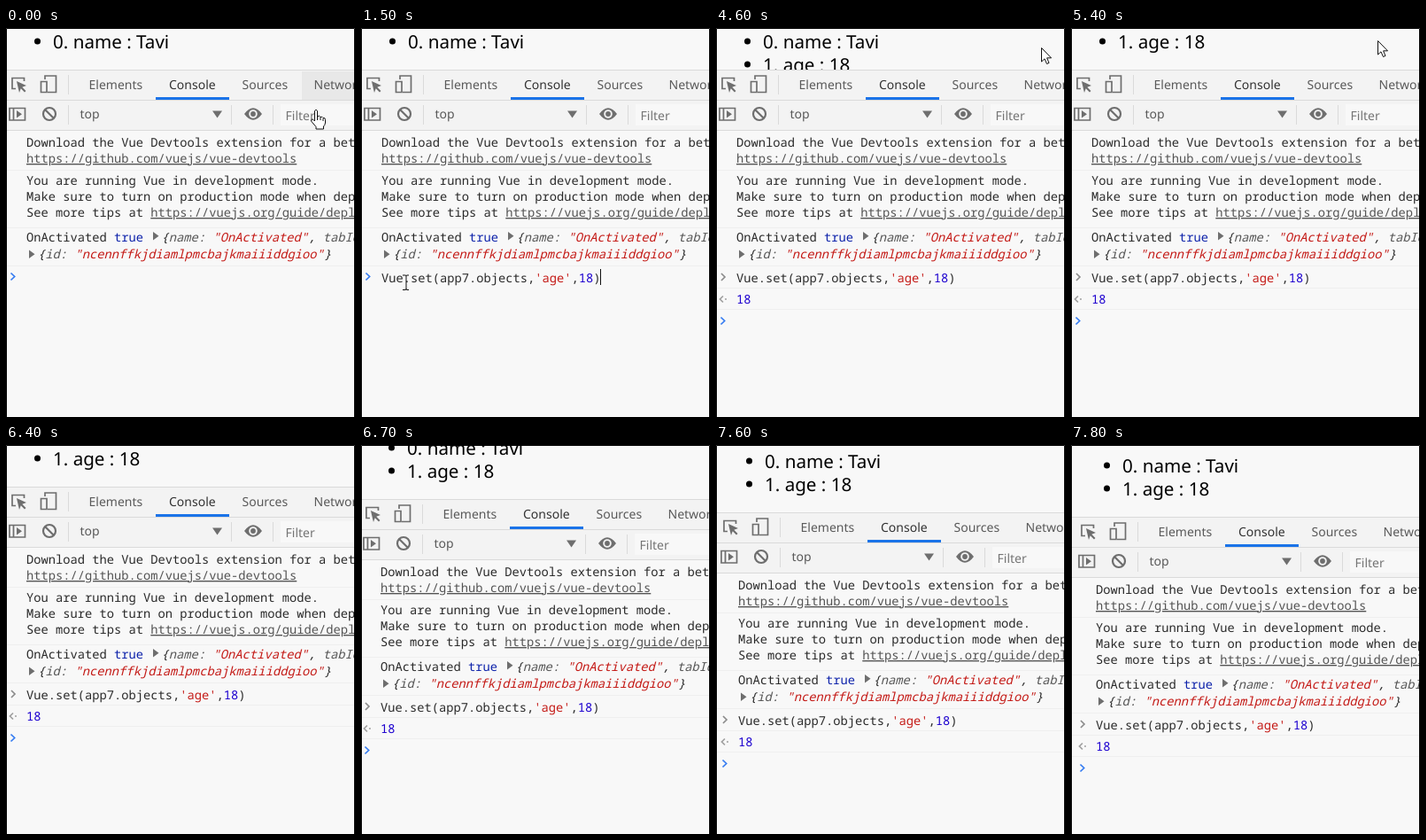
These frames come from a looping animation (394x439 px, 8000 ms). An HTML page:

```html
<!DOCTYPE html>
<html lang="en">
<head>
<meta charset="utf-8">
<title>Console demo</title>
<style>
html, body { margin: 0; width: 100%; height: 100%; overflow: hidden; background: #f8f8f8; }
svg { display: block; width: 394px; height: 439px; }
text { text-rendering: geometricPrecision; }
.list { font: 20.6px "Noto Sans", "Open Sans", sans-serif; }
.ui { font: 14px "Noto Sans", "Open Sans", sans-serif; fill: #5a5a5a; }
.log { font: 13.76px "Noto Sans Mono", monospace; fill: #2a2a2a; }
.obj { font-size: 13.8px; font-style: italic; }
.key { fill: #565656; }
.link { fill: #545454; text-decoration: underline; }
.str { fill: #c41a16; }
.num { fill: #1c00cf; }
.bool { fill: #0d22aa; }
.icon { fill: none; stroke: #6e6e6e; stroke-width: 1.7; }
.solid { fill: #6e6e6e; }
.line { stroke: #efefef; }
.bar { stroke: #dadada; }
.chev { fill: none; stroke-width: 1.7; }
</style>
</head>
<body>
<svg viewBox="0 0 394 439">
  <rect width="394" height="439" fill="#f8f8f8"/>
  <g id="list" class="list">
    <circle cx="35.5" cy="15" r="3.5"/><text x="53" y="22.5">0. name : Tavi</text>
    <g id="age"><circle cx="35.5" cy="41" r="3.5"/><text x="53" y="48.5">1. age : 18</text></g>
  </g>

  <g id="tools">
    <rect x="-20" y="47" width="440" height="420" fill="#f8f8f8"/>
    <rect x="-20" y="47" width="440" height="68" fill="#f3f3f3"/>
    <rect id="hover" x="334" y="49" width="80" height="32" fill="#e8e8e8"/>
    <path class="bar" d="M-20 47.5H420M-20 81.5H420M-20 115.5H420M70.5 53V75M70.5 87V109M254.5 87V109M301.5 87V109"/>
    <rect x="310" y="86" width="100" height="24" fill="#f8f8f8"/>
    <rect x="169" y="78" width="83" height="3" fill="#1a73e8"/>

    <g class="icon">
      <path d="M11 68.5H7V56.5H20.5V60"/>
      <path d="M44 58V54H56.5V72.5H47M39.5 60.5H46V72.5H39.5Z"/>
      <path d="M4 90.5H21.5V104H4ZM8.5 90V104"/>
      <path stroke-width="2.2" d="M42 97a7 7 0 1 0 14 0a7 7 0 1 0 -14 0M44 92L54 102"/>
    </g>
    <g class="solid">
      <path d="M12 60L23 65L18.3 66.8L22.5 71L21 72.5L16.8 68.3L15 73Z"/>
      <path d="M12 93L18 97.2L12 101.5Z"/>
      <path d="M233 93.5H244L238.5 101.5Z"/>
      <path fill-rule="evenodd" d="M269 97Q279 83.5 289 97Q279 110.5 269 97ZM274.2 97a4.8 4.8 0 1 0 9.6 0a4.8 4.8 0 1 0 -9.6 0Z"/>
      <circle cx="279" cy="97" r="2.9"/>
      <path d="M166 230V239.5L172.5 234.7ZM26 250.5V260L32.5 255.2Z"/>
    </g>

    <g class="ui">
      <text x="93.5" y="68.5">Elements</text>
      <text x="184" y="68.5" style="fill:#333">Console</text>
      <text x="266.5" y="68.5">Sources</text>
      <text x="347.5" y="68.5">Network</text>
      <text x="83.5" y="102">top</text>
      <text x="315.5" y="103.5" style="fill:#757575">Filter</text>
    </g>

    <path class="line" d="M-20 160.5H420M-20 225.5H420M-20 268.5H420"/>
    <g class="log">
      <text x="23" y="134">Download the Vue Devtools extension for a better experience:</text>
      <text x="23" y="152" class="link">https://github.com/vuejs/vue-devtools</text>
      <text x="23" y="177">You are running Vue in development mode.</text>
      <text x="23" y="195">Make sure to turn on production mode when deploying.</text>
      <text x="23" y="213">See more tips at <tspan class="link">https://vuejs.org/guide/deployment.html</tspan></text>
      <text x="23" y="241">OnActivated <tspan class="bool">true</tspan></text>
      <text x="175.5" y="241" class="obj">{<tspan class="key">name:</tspan> <tspan class="str">"OnActivated"</tspan>, <tspan class="key">tabId:</tspan> 18}</text>
      <text x="36" y="260" class="obj">{<tspan class="key">id:</tspan> <tspan class="str">"ncennffkjdiamlpmcbajkmaiiiddgioo"</tspan>}</text>
      <text id="command" x="23" y="287">Vue.set(app7.objects,<tspan class="str">'age'</tspan>,<tspan class="num">18</tspan>)</text>
      <text id="answer" x="23" y="311" class="num">18</text>
    </g>
    <g id="sent">
      <path class="line" d="M-20 293.5H420"/>
      <path class="chev" stroke="#8c8c8c" d="M6 277L10 281L6 285"/>
    </g>
    <g id="reply">
      <path class="line" d="M-20 317.5H420"/>
      <path class="chev" stroke="#a0a0a0" d="M8 302.5L4.5 306L8 309.5"/>
      <circle cx="11" cy="306" r="1" fill="#a0a0a0"/>
    </g>
    <g id="prompt">
      <path class="chev" stroke="#367cf1" d="M5.5 -4.5L9.7 -.5L5.5 3.5"/>
      <rect id="caret" y="-9" width="1" height="18" fill="#111"/>
    </g>
  </g>

  <path d="M.5 439V.5H393.5V439" fill="none" stroke="#000"/>

  <g id="pointer" fill="#fff" stroke="#111" stroke-linejoin="round">
    <path id="arrow" d="M.5 .5V16L4 12.8L6.5 18.5L9 17.4L6.6 11.8H11.5Z"/>
    <path id="hand" d="M-1.5 11V1.5Q0 -1 1.5 1.5V8Q3.5 6 5 8.5Q7 7.5 8 9.5Q10.5 9 10.5 11.5V15Q10 18 8.5 19V22H0V19.5L-5.5 13Q-5.5 10 -3 11.5L-1.5 13ZM1.5 8V12M5 9V12M8 10V13"/>
    <path id="beam" fill="none" d="M-1 -8H2Q3 -8 3 -7Q3 -8 4 -8H6M3 -7V8M-1 8.5H2Q3 8.5 3 7.5Q3 8.5 4 8.5H6"/>
  </g>
</svg>
<script>
const $ = id => document.getElementById(id);
const show = (id, on) => $(id).style.display = on ? "" : "none";
const move = (id, x, y) => $(id).setAttribute("transform", `translate(${x} ${y})`);

// Keys are [time, x, y], joined by straight lines
const mouse = [
  [0, 350, 92], [200, 270, 140], [500, 90, 265], [600, 55, 279], [700, 48, 287],
  [3900, 48, 287], [4300, 290, 120], [4500, 380, 25], [4600, 367, 22], [4800, 348, 18],
  [5100, 346, 14], [5800, 346, 14], [5900, 338, 10], [6000, 318, -1], [6100, 310, -30]
];
const drag = [
  [6400, 0, 0], [6700, -1, 14], [6900, -2, 20], [7200, -2, 20], [7300, -2, 22], [7800, 5, 34]
];
const scroll = [[4800, 0, 0], [5100, 0, -26]];
const blinks = [900, 1300, 1500, 2000, 2500, 3500, 4000, 4500, 5000, 5400, 5900, 6400];

function at(keys, t) {
  const i = keys.findIndex(k => k[0] > t);
  if (i < 0) return keys[keys.length - 1].slice(1);
  if (i === 0) return keys[0].slice(1);
  const [t0, x0, y0] = keys[i - 1], [t1, x1, y1] = keys[i];
  const p = (t - t0) / (t1 - t0);
  return [Math.round(x0 + (x1 - x0) * p), Math.round(y0 + (y1 - y0) * p)];
}

function draw(now) {
  const t = Math.floor(now % 8000 / 100) * 100;
  const [dx, dy] = at(drag, t);
  move("tools", dx, dy);
  move("list", dx, dy + at(scroll, t)[1]);
  move("pointer", ...at(mouse, t));

  const sent = t >= 3000, reply = t >= 3100;
  show("hover", t < 100);
  show("age", sent);
  show("command", t >= 1500);
  show("sent", sent);
  show("answer", reply);
  show("reply", reply);

  move("prompt", 0, reply ? 331 : sent ? 306 : 281);
  show("caret", blinks.filter(b => b <= t).length % 2);
  $("caret").setAttribute("x", t >= 1500 && !sent ? 270 : 23);

  show("hand", t < 200);
  show("beam", t >= 700 && t < 1800);
  show("arrow", t >= 200 && t < 700 || sent && t < 6100);
}

function tick() {
  draw(performance.now());
  requestAnimationFrame(tick);
}
tick();
</script>
</body>
</html>
```
